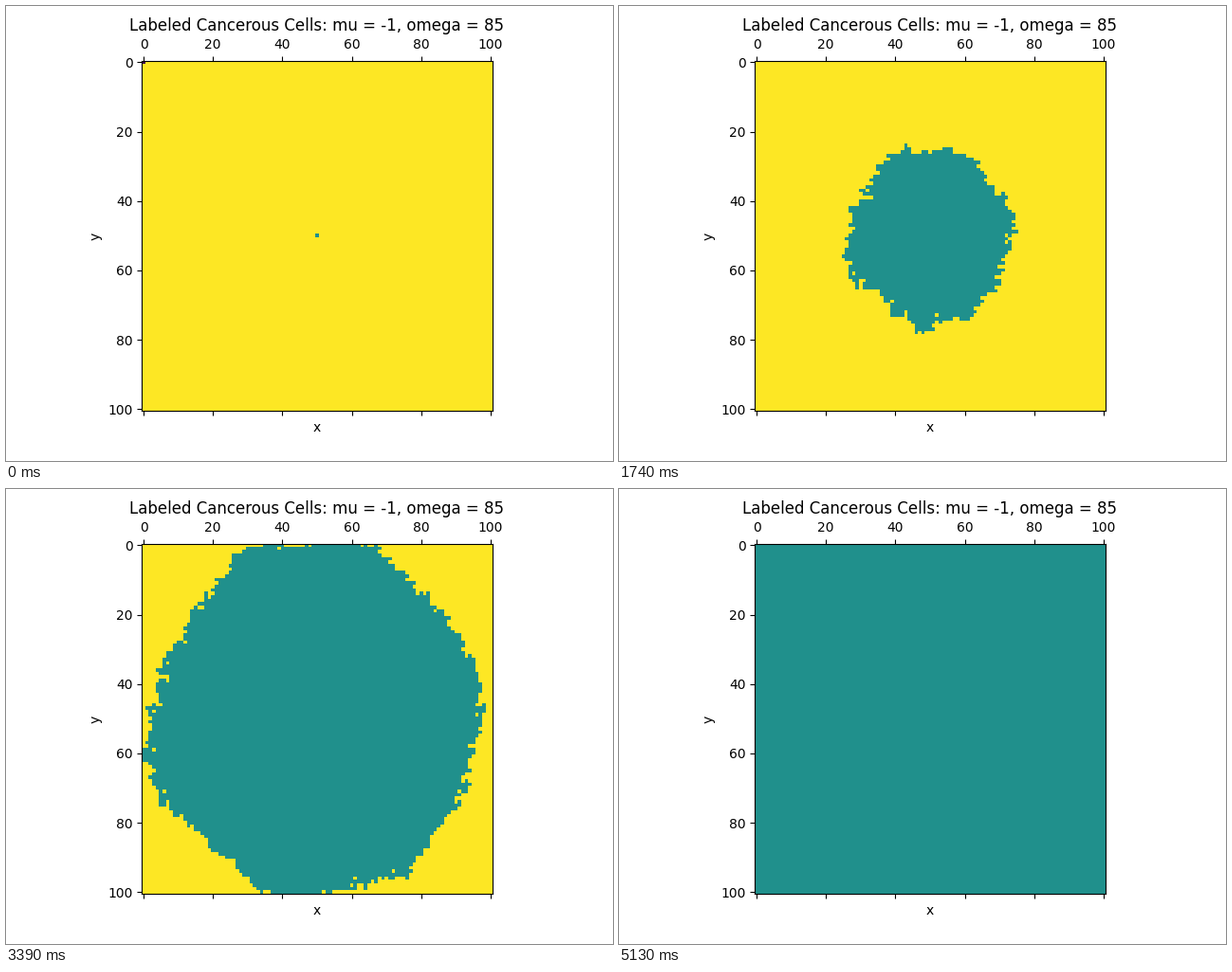
A matplotlib script that plays this animation: 640 by 480 pixels, repeating every 6410 ms.

```python
import numpy as np
import matplotlib.pyplot as plt
from matplotlib.animation import FuncAnimation

SIZE = 101
MID = SIZE // 2
LOOP_MS = 6410
FRAMES = 214
LAST_STEP = 171
SPEED = 0.43        # cells per step once the growth is under way
LOBE_WIDTH = 12     # degrees
DARK, SICK, HEALTHY = 0, 1, 2

# Directions (clockwise from the right) that grow faster, and by how much
LOBES = {64: 0.1, 100: 0.13, 158: 0.1, 250: 0.14, 284: 0.13, 350: 0.03}


def smooth(a):
    p = np.pad(a, 1, mode="edge")
    return sum(p[i:i + SIZE, j:j + SIZE] for i in range(3) for j in range(3)) / 9


def lowest_neighbour(a):
    p = np.pad(a, 1, constant_values=1e6)
    return np.min([p[:-2, 1:-1], p[2:, 1:-1], p[1:-1, :-2], p[1:-1, 2:]], axis=0)


def arrival_times():
    """Step at which each cell is taken over by the growing front."""
    rng = np.random.default_rng(85)
    y, x = np.mgrid[:SIZE, :SIZE] - MID
    r = np.hypot(x, y)
    angle = np.degrees(np.arctan2(y, x))

    reach = np.ones_like(r)
    for centre, height in LOBES.items():
        off = (angle - centre + 180) % 360 - 180
        reach += height * np.exp(-0.5 * (off / LOBE_WIDTH) ** 2)

    slow_start = 2 * (1 - np.exp(-r / 8))
    t = (r / reach + slow_start) / SPEED
    t += rng.normal(0, 1.8, t.shape) + smooth(rng.normal(0, 5, t.shape))
    t = np.clip(t, 1, None)
    t[MID, MID] = 0
    # Cells only catch it from a side neighbour, so no islands form
    for _ in range(60):
        t = np.maximum(t, lowest_neighbour(t) + 0.2)
        t[MID, MID] = 0
    return np.minimum(t, LAST_STEP)


arrival = arrival_times()


def cells(step):
    grid = np.where(arrival <= step, SICK, HEALTHY)
    if step == 0:
        grid[0, 0] = DARK
    return grid


fig, ax = plt.subplots(figsize=(6.4, 4.8), dpi=100)
image = ax.matshow(cells(0), cmap="viridis", vmin=DARK, vmax=HEALTHY)
ax.set_title("Labeled Cancerous Cells: mu = -1, omega = 85")
ax.set_xlabel("x")
ax.set_ylabel("y")


def update(step):
    image.set_data(cells(step))
    return [image]


anim = FuncAnimation(fig, update, frames=FRAMES, interval=LOOP_MS / FRAMES,
                     repeat=True, repeat_delay=0, cache_frame_data=False)
plt.show()
```
